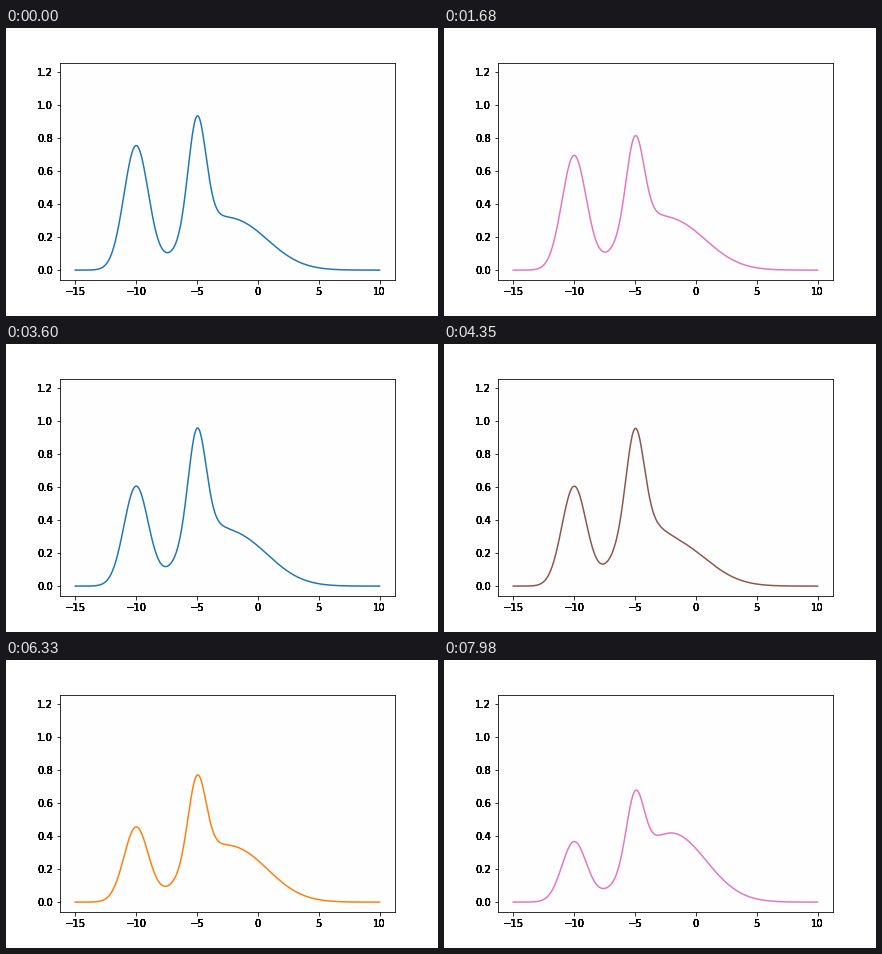
A matplotlib script for the animation above (8000 ms loop, 432 by 288 pixels).

```python
import numpy as np
import matplotlib.pyplot as plt
from matplotlib.animation import FuncAnimation

plt.rcParams.update({"font.family": "DejaVu Sans", "font.size": 10})

LOOP, INTERVAL, STEP = 8000, 20, 30  # ms
X = np.linspace(-15, 10, 1000)


def bell(mean, sd, x=X):
    return np.exp(-0.5 * ((x - mean) / sd) ** 2)


LEFT = bell(-10, 1.0)
NARROW = bell(-5, 0.72)
WIDE = bell(-5, 1.6)
BROAD = bell(-2, 2.83)
BROAD_AT_PEAK = bell(-2, 2.83, -5)

# step, left bump, middle peak, wide base of the peak, broad hump
KEYS = np.array([
    (0, 0.75, 0.935, 0.09, 0.30),
    (56, 0.69, 0.815, 0.11, 0.30),
    (95, 0.60, 0.79, 0.07, 0.353),
    (145, 0.60, 0.945, 0.23, 0.27),
    (176, 0.57, 0.875, 0.165, 0.30),
    (211, 0.45, 0.77, 0.09, 0.325),
    (266, 0.36, 0.675, 0.01, 0.418),
]).T


def swell(step):
    """Three surges of the middle peak, one after the other."""
    phase = (step - 111) / 33
    return 0.12 * abs(np.sin(np.pi * phase)) if 0 < phase < 3 else 0.0


def density(step):
    left, peak, wide, broad = (np.interp(step, KEYS[0], h) for h in KEYS[1:])
    narrow = peak + swell(step) - wide - broad * BROAD_AT_PEAK
    return left * LEFT + narrow * NARROW + wide * WIDE + broad * BROAD


fig = plt.figure(figsize=(6, 4), dpi=72, facecolor="white")
ax = fig.add_axes([0.125, 0.125, 0.775, 0.755], facecolor="#fefefe")
ax.set_xlim(-16.25, 11.25)
ax.set_ylim(-0.06, 1.26)
xticks = np.arange(-15, 11, 5)
yticks = np.arange(7) * 0.2
ax.set_xticks(xticks, [])
ax.set_yticks(yticks, [])


def draw_labels():
    trans, va, ha = ax.get_xaxis_text1_transform(7)
    for v in xticks:
        ax.text(v, 0, f"{v}".replace("-", "\u2212"), transform=trans,
                va=va, ha=ha, rotation_mode="anchor")
    trans, va, ha = ax.get_yaxis_text1_transform(7)
    for v in yticks:
        ax.text(0, v, f"{v:.1f}", transform=trans,
                va=va, ha=ha, rotation_mode="anchor")


# Overprinting gives the labels heavy edges
for _ in range(6):
    draw_labels()

line, = ax.plot(X, density(0), color="C0", lw=1.5)


def update(i):
    step = (i * INTERVAL + INTERVAL // 2) // STEP
    line.set_ydata(density(step))
    line.set_color(f"C{step % 10}")
    return line,


anim = FuncAnimation(fig, update, frames=LOOP // INTERVAL, interval=INTERVAL,
                     init_func=lambda: update(0), repeat=True,
                     repeat_delay=0, blit=False)
plt.show()
```
